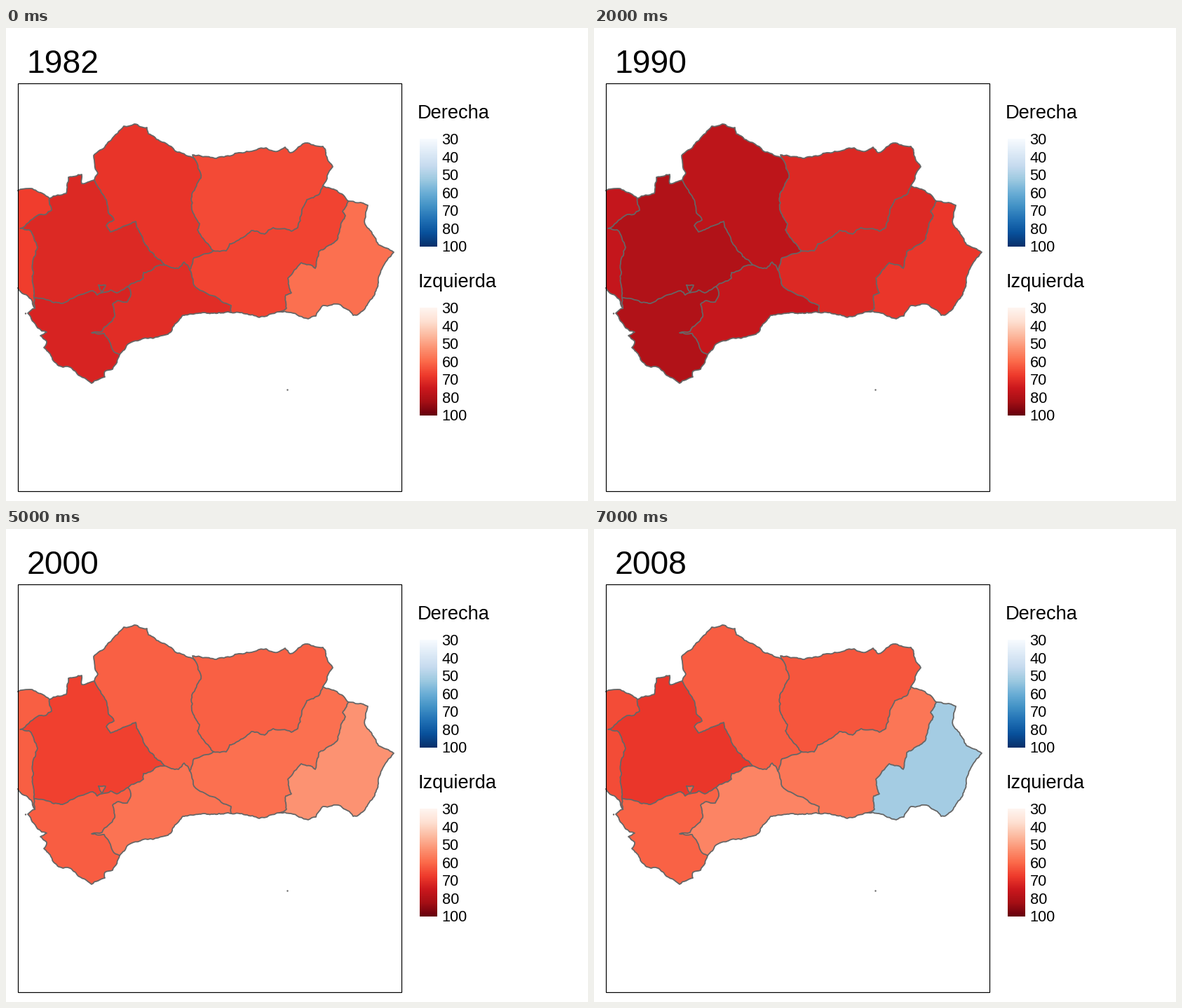
A matplotlib script that plays this animation: 830 by 675 pixels, repeating every 8 s.

```python
import random

import numpy as np
import matplotlib.pyplot as plt
from matplotlib.animation import FuncAnimation
from matplotlib.patches import Circle, Polygon, Rectangle

W, H, DPI = 830, 675, 100
GREY = "#666666"
rng = random.Random(4)

plt.rcParams["font.family"] = "Liberation Sans"


def px(n):
    """Pixels to points."""
    return n * 72 / DPI


def ragged(a, b):
    """Midpoint displacement from a up to, but not including, b."""
    dx, dy = b[0] - a[0], b[1] - a[1]
    length = np.hypot(dx, dy)
    if length < 4:
        return [a]
    k = rng.uniform(-1, 1) * min(0.12, 1.6 / length)
    mid = (a[0] + dx / 2 - k * dy, a[1] + dy / 2 + k * dx)
    return ragged(a, mid) + ragged(mid, b)


borders = []


def border(*keys):
    """Ragged line through a few key points."""
    line = [p for a, b in zip(keys, keys[1:]) for p in ragged(a, b)]
    borders.append(line + [keys[-1]])
    return borders[-1]


# Outer borders, clockwise
huelva_north = border((17, 232), (32, 229), (52, 236), (62, 243))
sevilla_north = border((62, 243), (86, 236), (89, 213), (108, 209), (108, 222),
                       (126, 217))
cordoba_north = border((126, 217), (131, 207), (125, 182), (150, 160),
                       (168, 140), (183, 137), (201, 142), (203, 151),
                       (219, 161), (244, 177), (269, 187))
jaen_north = border((269, 187), (266, 181), (300, 186), (343, 176), (371, 171),
                    (387, 176), (398, 170), (405, 178), (430, 164), (452, 169),
                    (466, 198), (452, 225))
granada_north = border((452, 225), (472, 232), (488, 247))
almeria_coast = border((488, 247), (516, 253), (512, 280), (531, 309),
                       (553, 320), (536, 344), (525, 382), (503, 408),
                       (495, 410), (477, 395), (452, 396), (442, 411),
                       (431, 415), (406, 406), (390, 405))
granada_coast = border((390, 405), (361, 413), (321, 406))
malaga_coast = border((321, 406), (252, 410), (231, 437), (174, 451),
                      (162, 466))
cadiz_coast = border((162, 466), (152, 487), (141, 490), (141, 498), (122, 507),
                     (101, 493), (88, 483), (75, 482), (54, 456), (58, 447),
                     (49, 439), (58, 434), (45, 428), (31, 407), (41, 400))
huelva_coast = border((41, 400), (36, 387), (17, 371))

# Inner borders
huelva_sevilla = border((62, 243), (65, 260), (57, 266), (44, 268), (20, 286),
                        (33, 288), (45, 313), (38, 336), (40, 385))
huelva_cadiz = border((40, 385), (41, 400))
sevilla_cadiz = border((40, 385), (78, 393), (97, 385), (124, 375), (130, 381),
                       (149, 374), (158, 378), (174, 369))
cadiz_malaga = border((174, 369), (178, 381), (173, 391), (160, 389),
                      (152, 394), (155, 412), (137, 433), (122, 435),
                      (140, 436), (152, 459), (162, 466))
sevilla_malaga = border((174, 369), (196, 357), (196, 349), (226, 338))
sevilla_cordoba = border((126, 217), (140, 240), (146, 264), (154, 274),
                         (143, 282), (149, 291), (185, 276), (197, 306),
                         (212, 326), (226, 338))
cordoba_malaga = border((226, 338), (246, 343), (254, 334), (262, 345))
cordoba_granada = border((262, 345), (268, 328), (296, 318))
cordoba_jaen = border((269, 187), (278, 214), (265, 237), (266, 262),
                      (276, 279), (273, 288), (296, 318))
jaen_granada = border((296, 318), (314, 318), (319, 308), (350, 289),
                      (369, 294), (381, 285), (407, 290), (416, 285),
                      (429, 245), (447, 237), (452, 225))
malaga_granada = border((262, 345), (268, 367), (321, 396), (321, 406))
granada_almeria = border((488, 247), (480, 262), (484, 268), (473, 301),
                         (446, 319), (441, 343), (421, 335), (402, 357),
                         (407, 378), (399, 381), (400, 400), (390, 405))
enclave = border((132, 367), (142, 367), (137, 377), (132, 367))


def ring(*arcs):
    return [p for arc in arcs for p in arc]


provinces = [
    # Huelva, Sevilla, Cadiz, Cordoba
    ring(huelva_north, huelva_sevilla, huelva_cadiz, huelva_coast),
    ring(sevilla_north, sevilla_cordoba, sevilla_malaga[::-1],
         sevilla_cadiz[::-1], huelva_sevilla[::-1]),
    ring(sevilla_cadiz, cadiz_malaga, cadiz_coast, huelva_cadiz[::-1]),
    ring(cordoba_north, cordoba_jaen, cordoba_granada[::-1],
         cordoba_malaga[::-1], sevilla_cordoba[::-1]),
    # Malaga, Jaen, Granada, Almeria
    ring(sevilla_malaga, cordoba_malaga, malaga_granada, malaga_coast,
         cadiz_malaga[::-1]),
    ring(jaen_north, jaen_granada[::-1], cordoba_jaen[::-1]),
    ring(jaen_granada, granada_north, granada_almeria, granada_coast,
         malaga_granada[::-1], cordoba_granada),
    ring(almeria_coast, granada_almeria[::-1]),
]

# Winning share per province; negative where the right wins
shares = {
    1982: (67.2, 71.4, 72.6, 69.0, 70.5, 65.1, 66.2, 58.9),
    1986: (76.4, 77.0, 77.6, 74.6, 74.1, 69.2, 69.6, 65.2),
    1990: (76.4, 80.0, 80.3, 77.6, 76.0, 71.4, 71.4, 68.6),
    1994: (66.2, 69.3, 66.8, 69.5, 62.7, 64.4, 61.3, 57.5),
    2000: (61.7, 66.7, 62.1, 61.5, 58.3, 61.6, 58.9, 52.5),
    2004: (71.3, 72.6, 67.5, 64.8, 63.4, 67.4, 62.8, 55.9),
    2008: (64.8, 68.6, 61.4, 62.1, 55.1, 63.2, 57.8, -51.5),
}
shares[1996] = shares[1994]
years = sorted(shares)


def fill(share):
    cmap = plt.cm.Reds if share > 0 else plt.cm.Blues
    return cmap(np.interp(abs(share), (30, 80, 100), (0, 5 / 6, 1)))


fig = plt.figure(figsize=(W / DPI, H / DPI), dpi=DPI, facecolor="white")
ax = fig.add_axes([0, 0, 1, 1])
ax.axis("off")
ax.set_xlim(0, W)
ax.set_ylim(H, 0)
ax.set_autoscale_on(False)

patches = [ax.add_patch(Polygon(shape, lw=0)) for shape in provinces]
inset = ax.add_patch(Polygon(enclave, lw=0))
for line in borders:
    ax.plot(*zip(*line), color=GREY, lw=px(1.8), solid_joinstyle="round")
for spot in ((28, 407.5), (401.5, 516.5)):
    ax.add_patch(Circle(spot, 1.2, fc=GREY, lw=0))
ax.add_patch(Rectangle((17, 79), 547, 582, fill=False, ec="black",
                       lw=px(1.2), zorder=5))


def legend(name, baseline, top, cmap):
    ax.text(587, baseline, name, size=px(27.3))
    ax.imshow(np.linspace(0, 1, 154)[:, None], cmap=cmap, aspect="auto",
              extent=(590, 615, top + 154, top), interpolation="nearest")
    for i, label in enumerate((30, 40, 50, 60, 70, 80, 100)):
        ax.text(621.5, top + 8.2 + 25.5 * i, label, size=px(21.8))


legend("Derecha", 129, 158, "Blues")
legend("Izquierda", 370, 399, "Reds")
title = ax.text(29.5, 63.7, "", size=px(46.3))


def update(i):
    year = years[i]
    title.set_text(str(year))
    for patch, share in zip(patches, shares[year]):
        patch.set_facecolor(fill(share))
    inset.set_facecolor(patches[2].get_facecolor())
    return [title, inset, *patches]


anim = FuncAnimation(fig, update, frames=len(years), interval=1000, repeat=True)
plt.show()
```
